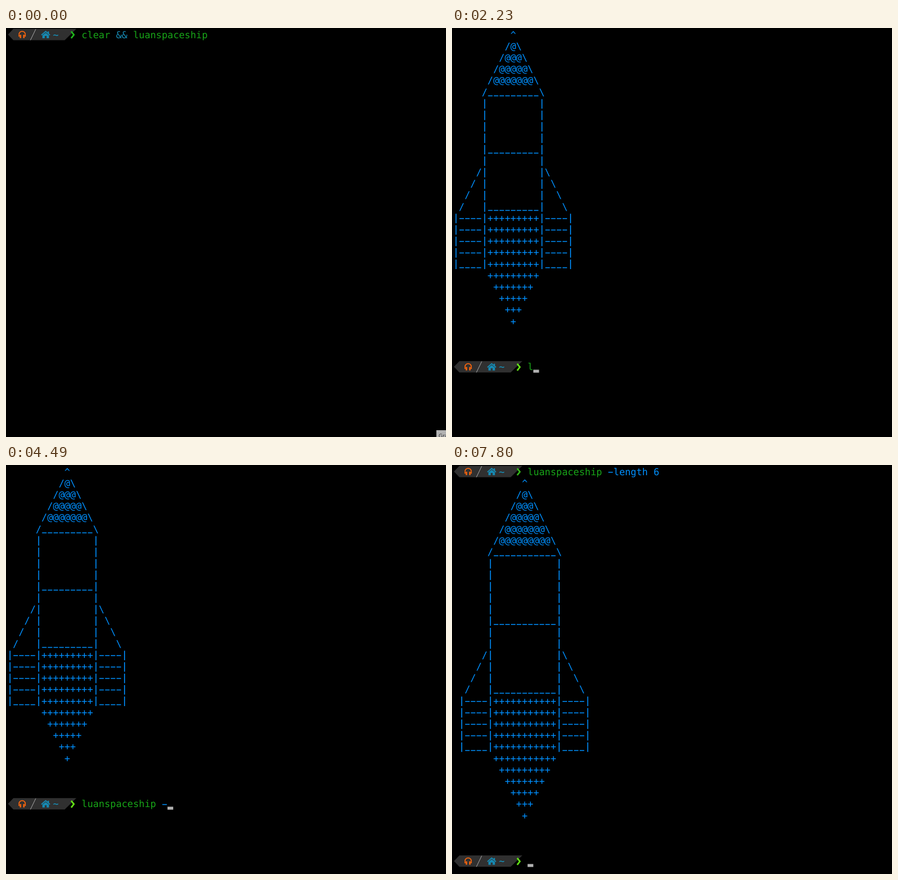
An HTML page with a canvas for the animation above (8 s loop, 776 px wide and 721 px high).

```html
<!DOCTYPE html>
<html lang="en">
<head>
<meta charset="utf-8">
<title>Terminal spaceship</title>
<style>
  html, body { margin: 0; width: 100%; height: 100%; overflow: hidden; background: #000; }
  canvas { display: block; }
</style>
</head>
<body>
<canvas id="stage" width="776" height="721"></canvas>
<script>
const ctx = document.getElementById('stage').getContext('2d');
const LOOP = 8000, CELL = 10.1, ROW = 20.2, KEY_GAP = 100;
const GREEN = '#18a518', BLUE = '#0090ff', TEAL = '#1689b2', PINK = '#f500c4';
const ORANGE = '#f2640f', LIGHT = '#b2b2b2', LIME = '#62df16';
const NAME = 'luanspaceship', COMMAND = NAME + ' -length 6';
// Bursts of typing: start time and the keys struck one after another
const BURSTS = [[2230, 'l'], [2490, 'uan'], [3080, 's'], [3290, 'pace'], [3750, 's'],
  [3960, 'hip'], [4360, ' -'], [4750, 'length '], [6010, '6']];

const colX = col => 2 + col * CELL;

function rect(x, y, w, h, color) {
  ctx.fillStyle = color;
  ctx.fillRect(x, y, w, h);
}

function trace(points) {
  ctx.beginPath();
  points.forEach(([x, y]) => ctx.lineTo(x, y));
}

function shape(points, color) {
  trace(points);
  ctx.fillStyle = color;
  ctx.fill();
}

function line(points, color, width) {
  trace(points);
  ctx.strokeStyle = color;
  ctx.lineWidth = width;
  ctx.stroke();
}

// Straight characters are drawn as bars, all others as text
function put(row, col, text, color) {
  const y = 17.6 + row * ROW;
  ctx.font = '16.8px "DejaVu Sans Mono", monospace';
  ctx.textRendering = 'geometricPrecision';
  ctx.fillStyle = color;
  [...text].forEach((ch, i) => {
    const x = colX(col + i);
    if (ch === '-') ctx.fillRect(x + 1, y - 5.6, 8, 1.5);
    else if (ch === '_') ctx.fillRect(x + 1, y + 0.2, 8, 1.5);
    else if (ch === '|') ctx.fillRect(x + 4.3, y - 13.4, 1.6, 16.8);
    else if (ch !== ' ') ctx.fillText(ch, x, y);
  });
}

function cursor(row, col) {
  rect(colX(col), 16.6 + row * ROW, CELL, 5.2, LIGHT);
}

function headphones(x, y) {
  ctx.strokeStyle = ORANGE;
  ctx.lineWidth = 1.8;
  ctx.beginPath();
  ctx.arc(x, y, 5.5, Math.PI, 0);
  ctx.stroke();
  for (const side of [-1, 1]) {
    rect(x + side * 5.5 - 0.9, y, 1.8, 4, ORANGE);
    rect(x + side * 3 - 1.3, y + 0.5, 2.6, 6, ORANGE);
  }
}

function house(x, y) {
  line([[x - 7.5, y + 7.5], [x, y + 1], [x + 7.5, y + 7.5]], TEAL, 1.8);
  rect(x + 3.5, y + 1, 2.3, 4, TEAL);
  shape([[x - 5.8, y + 13], [x - 5.8, y + 8], [x, y + 3.4], [x + 5.8, y + 8], [x + 5.8, y + 13]], TEAL);
  rect(x - 1.6, y + 9, 3.2, 4, '#303030');
}

function prompt(row, arrow) {
  ctx.save();
  ctx.translate(0, row * ROW);
  shape([[3.5, 11.5], [13, 1.5], [124, 1.5], [103.5, 21.5], [13, 21.5]], '#303030');
  line([[43, 21.5], [52.5, 2]], '#a8a8a8', 1);
  headphones(28.5, 11.3);
  house(70, 5);
  put(0, 8, '~', '#149bc8');
  line([[115, 6], [119.7, 12], [115, 18]], arrow, 2.8);
  ctx.restore();
}

function ship(n, top) {
  const mid = 2 * n, left = mid - n, inner = 2 * n - 1;
  let row = top;
  const center = text => put(row, mid - (text.length - 1) / 2, text, BLUE);
  center('^');
  for (let i = 1; i < n; i++) {
    row++;
    center('/' + '@'.repeat(2 * i - 1) + '\\');
  }
  row++;
  center('/' + '_'.repeat(inner) + '\\');
  for (let i = 1; i <= 2 * n; i++) {
    row++;
    center('|' + (i % n ? ' ' : '_').repeat(inner) + '|');
    const wing = i - 2 * n + 4;
    if (wing > 0) {
      put(row, left - wing, '/', BLUE);
      put(row, left + 2 * n + wing, '\\', BLUE);
    }
  }
  for (let i = 0; i < 5; i++) {
    row++;
    const fin = '|' + (i < 4 ? '-' : '_').repeat(4) + '|';
    center(fin + '+'.repeat(inner) + fin);
  }
  for (let w = inner; w > 0; w -= 2) {
    row++;
    center('+'.repeat(w));
  }
}

function command(row, text) {
  const word = text.slice(0, NAME.length);
  const known = ['l', 'luan', NAME].includes(word);
  put(row, 13, word, known ? GREEN : PINK);
  put(row, 13 + NAME.length, text.slice(NAME.length), BLUE);
}

function typed(t) {
  return BURSTS.map(([start, keys]) =>
    keys.slice(0, Math.max(0, Math.floor((t - start) / KEY_GAP) + 1))).join('');
}

// The mouse sweeps up from the corner, then settles slightly lower
function pointer(t) {
  const step = Math.min(10, Math.floor((t - 70) / 69));
  const p = Math.min(1, step / 9), e = p * p * (3 - 2 * p);
  const x = 760 - 358.5 * e, y = step === 10 ? 17 : 700 - 691 * e;
  shape([[x, y], [x, y + 12], [x + 8.2, y + 8.6]], '#fff');
  line([[x + 3, y + 7], [x + 5.6, y + 13.5]], '#fff', 2);
}

function firstCommand(t) {
  prompt(0, '#20b51c');
  put(0, 13, 'clear', GREEN);
  put(0, 19, '&&', TEAL);
  put(0, 22, NAME, GREEN);
  if (t < 70) {
    rect(759, 709, 17, 12, LIGHT);
    ctx.font = '9px "DejaVu Sans", sans-serif';
    ctx.fillStyle = '#333';
    ctx.fillText('Gra', 763, 722);
  } else {
    cursor(0, 35);
    pointer(t);
  }
}

function typing(t) {
  ship(5, 0);
  if (t < 1570) return cursor(28, 0);
  const text = typed(t);
  prompt(29, LIME);
  command(29, text);
  if (t < 6280) cursor(29, 13 + text.length);
  else cursor(30, 0);
}

function result(t) {
  prompt(0, '#35b81a');
  command(0, COMMAND);
  ship(6, 1);
  if (t < 6480) return cursor(34, 0);
  prompt(34, LIME);
  if (t >= 7410 && t < 7800) command(34, COMMAND);
  else cursor(34, 13);
}

function draw(t) {
  rect(0, 0, 776, 721, '#000');
  if (t < 1420) firstCommand(t);
  else if (t < 1490) cursor(0, 0);
  else if (t < 6410) typing(t);
  else result(t);
}

const start = performance.now();
function frame() {
  draw((performance.now() - start) % LOOP);
  requestAnimationFrame(frame);
}
frame();
</script>
</body>
</html>
```
